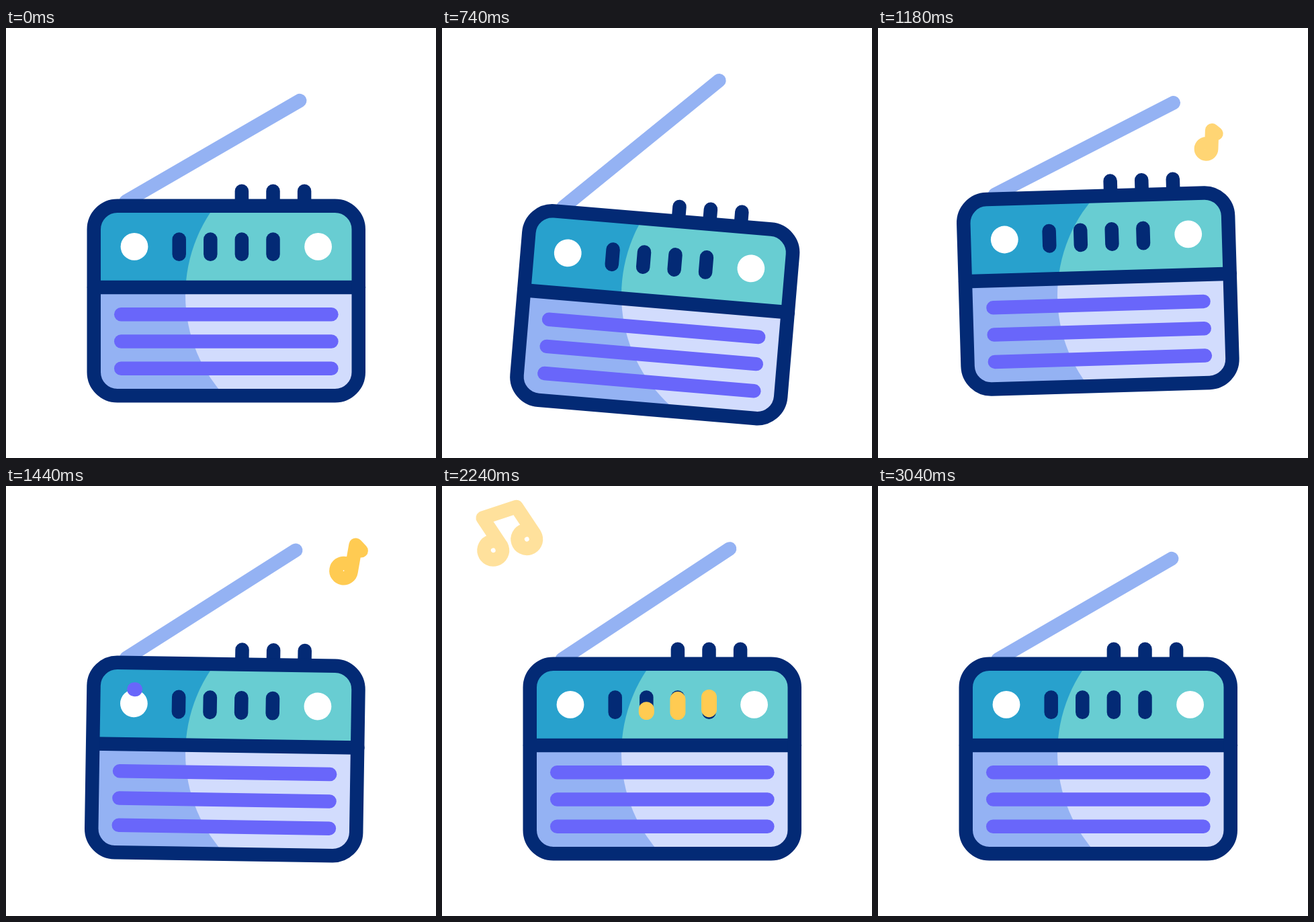
Write an HTML page with a canvas that moves like this. It is 640x640 px and loops after 3100 ms.

```html
<!DOCTYPE html>
<html lang="en">
<head>
<meta charset="utf-8">
<title>Radio</title>
<style>
html, body { margin: 0; height: 100%; overflow: hidden; background: #fff; }
canvas { display: block; width: 640px; height: 640px; }
</style>
</head>
<body>
<canvas id="stage" width="640" height="640"></canvas>
<script>
const LOOP = 3100, LINE = 20.5, RAD = Math.PI / 180;
const NAVY = '#032a75', BLUE = '#94b2f3', PURPLE = '#6966fa', YELLOW = '#ffcb52';
const c = document.getElementById('stage').getContext('2d');
c.lineCap = c.lineJoin = 'round';

// Keyframes of the swing: shared times, then one value per time
const times = [0, 380, 540, 650, 740, 1020, 1180, 1390, 1740, 2060, 2200];
const tilt = track(times, [0, 2.5, 4.7, 5.7, 4.8, -3.4, -1.7, 1, -1, .5, 0]);
const shiftX = track(times, [0, -.7, -6.5, -18, -11, 3, -.4, -2, 0, 0, 0]);
const shiftY = track(times, [0, 8.4, 17.6, 23, 20.7, -24, -14.5, .7, -3.5, 1.8, 0]);
const aerial = track([...times.slice(0, 9), 2130, 2240, 2450, 2660],
  [0, 5.7, 11.8, 18.4, 13.8, -10, -4.6, 3.7, -4.3, 4.5, 3.3, -1.5, 0]);

// Smooth curve through the points, flat at each extreme
function track(ts, vs) {
  const grad = i => (vs[i + 1] - vs[i]) / (ts[i + 1] - ts[i]);
  const slopes = vs.map((_, i) => {
    if (!i || i === vs.length - 1) return 0;
    const a = grad(i - 1), b = grad(i);
    return a * b > 0 ? 2 * a * b / (a + b) : 0;
  });
  return t => {
    const i = ts.findIndex(end => end > t) - 1;
    if (i < 0) return vs[vs.length - 1];
    const h = ts[i + 1] - ts[i], u = (t - ts[i]) / h, w = 1 - u;
    return vs[i] * (1 + 2 * u) * w * w + slopes[i] * h * u * w * w
      + vs[i + 1] * u * u * (3 - 2 * u) - slopes[i + 1] * h * u * u * w;
  };
}

const clamp = u => Math.max(0, Math.min(1, u));
const ease = u => (u = clamp(u), u * u * (3 - 2 * u));

function line(color, x1, y1, x2, y2, width = LINE) {
  c.strokeStyle = color;
  c.lineWidth = width;
  c.beginPath();
  c.moveTo(x1, y1);
  c.lineTo(x2, y2);
  c.stroke();
}

function disc(color, x, y, r) {
  c.fillStyle = color;
  c.beginPath();
  c.arc(x, y, r, 0, 7);
  c.fill();
}

function caseShape() {
  c.beginPath();
  c.roundRect(130.75, 264.75, 394, 282.5, 35);
}

function panels(top, bottom) {
  c.fillStyle = top;
  c.fillRect(120, 254, 416, 132);
  c.fillStyle = bottom;
  c.fillRect(120, 386, 416, 172);
}

function place(t) {
  c.setTransform(1, 0, 0, 1, 0, 0);
  c.translate(327.75 + shiftX(t), 406 + shiftY(t));
  c.rotate(tilt(t) * RAD);
  c.translate(-327.75, -406);
}

// Ring that grows from the top of a knob and is wiped off behind itself
function ring(x, age) {
  const head = ease(age / 400), tail = ease((age - 116) / 400);
  if (head - tail < .001) return;
  c.strokeStyle = PURPLE;
  c.lineWidth = 21;
  c.beginPath();
  c.arc(x, 325.5, 21.2, (tail * 360 - 90) * RAD, (head * 360 - 90) * RAD);
  c.stroke();
}

function level(x, age) {
  const head = ease(age / 180), tail = ease(age / 180 - 1);
  if (head - tail > .001) line(YELLOW, x, 336.5 - 22 * tail, x, 336.5 - 22 * head, 23);
}

function radio(t) {
  c.save();
  place(t);

  const a = (30.1 + aerial(t)) * RAD;
  line(BLUE, 178.5, 258, 178.5 + 299 * Math.cos(a), 258 - 299 * Math.sin(a));
  for (let i = 0; i < 3; i++) line(NAVY, 350.9 + i * 46.6, 242.7, 350.9 + i * 46.6, 264);

  // The lit disc stays still while the case swings
  c.save();
  caseShape();
  c.clip();
  panels('#28a1cd', BLUE);
  c.setTransform(1, 0, 0, 1, 0, 0);
  c.beginPath();
  c.arc(489, 397.7, 222, 0, 7);
  c.clip();
  place(t);
  panels('#68cdd2', '#d2dcfd');
  c.restore();

  line(NAVY, 131, 386, 525, 386);
  c.lineWidth = LINE;
  caseShape();
  c.stroke();

  for (let i = 0; i < 3; i++) line(PURPLE, 171.2, 426.2 + i * 40.3, 484.4, 426.2 + i * 40.3);
  for (let i = 0; i < 4; i++) {
    const x = 257.7 + i * 46.6;
    line(NAVY, x, 314.4, x, 336.8);
    level(x, t - 2012 - (3 - i) * 90);
  }
  disc('#fff', 191, 325.4, 20.4);
  disc('#fff', 464.6, 325.4, 20.4);
  ring(191, t - 1412);
  ring(464.6, t - 2524);
  c.restore();
}

function head(x) {
  c.moveTo(x + 13.75, 0);
  c.arc(x, 0, 13.75, 0, 2 * Math.PI);
}

function stroke(...points) {
  points.forEach(([x, y], i) => i ? c.lineTo(x, y) : c.moveTo(x, y));
}

function single() {
  head(0);
  stroke([13.75, 0], [13.75, -50.4], [25.4, -41.7]);
}

function pair() {
  head(-26.4);
  head(26.4);
  stroke([-13.1, -3.7], [-26, -50.7], [26.7, -50.7], [39.7, -3.7]);
}

// Notes grow along their path, but keep their line weight
function note(age, shape, pos, turn) {
  if (age <= 0 || age >= 860) return;
  const u = age / 850, rest = Math.max(0, 1 - u) ** 2, size = 1 - .57 * rest;
  c.save();
  c.translate(...pos(u, rest));
  c.rotate(turn(age) * RAD);
  c.scale(size, size);
  c.beginPath();
  shape();
  c.restore();
  c.globalAlpha = Math.min(clamp(age / 125), clamp((860 - age) / 105));
  c.strokeStyle = YELLOW;
  c.lineWidth = LINE;
  c.stroke();
  c.globalAlpha = 1;
}

function draw(now) {
  const t = now % LOOP;
  c.fillStyle = '#fff';
  c.fillRect(0, 0, 640, 640);
  radio(t);
  note(t - 1080, single, (u, rest) => [484.4 + 32 * u + 25.6 * u * u, 86 + 120.6 * rest],
    age => 2 + (age - 100) * .0305);
  note(t - 1440, pair, (u, rest) => [101 + 73 * rest, 87 + 132 * rest],
    age => (280 - age) * .0352);
}

let start;
function frame(now) {
  start ??= now;
  draw(now - start);
  requestAnimationFrame(frame);
}
draw(0);
requestAnimationFrame(frame);
</script>
</body>
</html>
```
